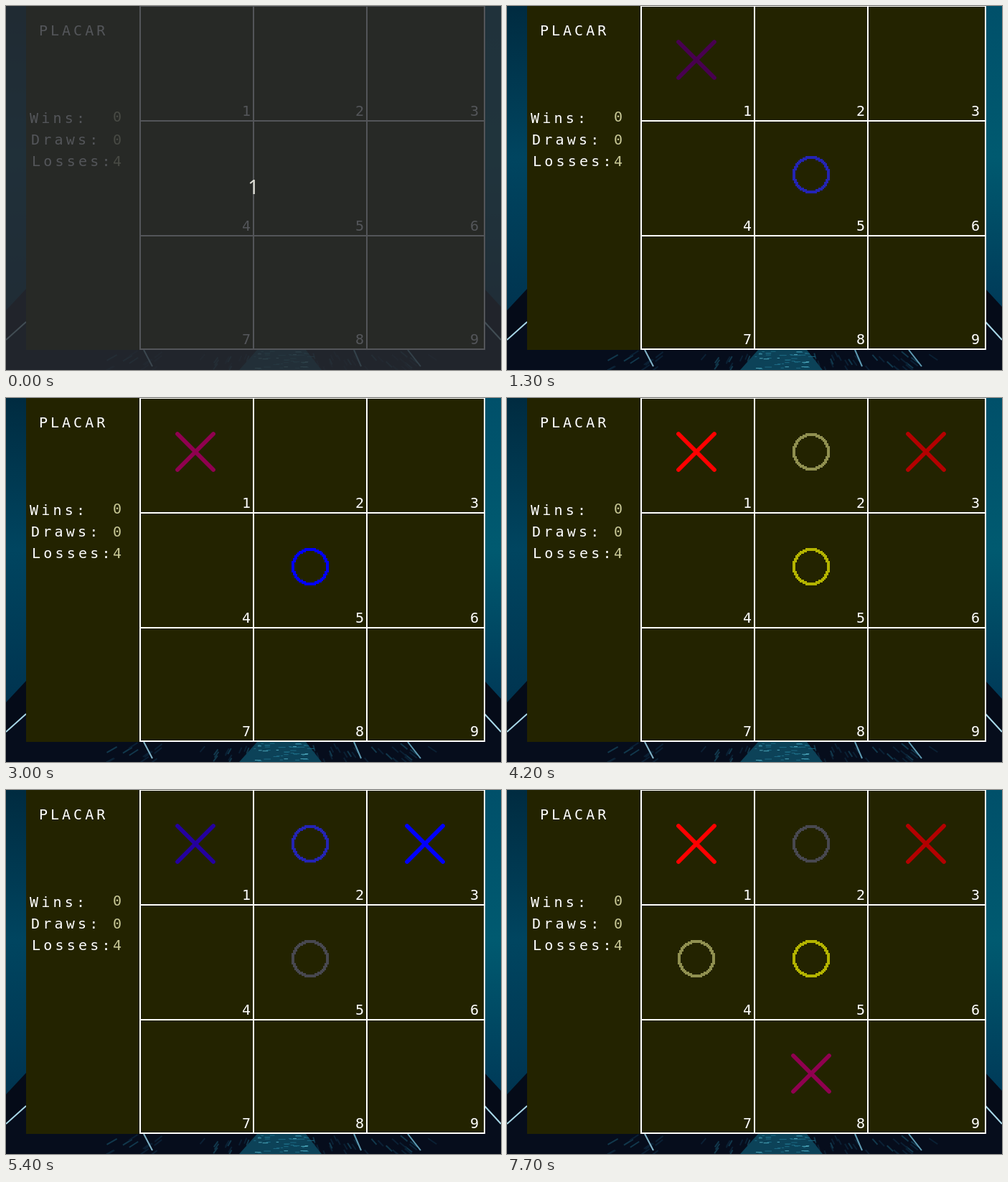
An HTML page with a canvas that plays this animation: 690 by 507 pixels, repeating every 8000 ms.

```html
<!DOCTYPE html>
<html lang="pt">
<meta charset="utf-8">
<title>Placar</title>
<style>
  html, body { margin: 0; width: 100%; height: 100%; overflow: hidden; background: #060d1c; }
  canvas { display: block; }
</style>
<canvas id="stage" width="690" height="507"></canvas>
<script>
const ctx = document.getElementById('stage').getContext('2d');
const LOOP = 8000;
const MONO = '20px "DejaVu Sans Mono", monospace';
const CROSS_COLORS = ['#f00', '#b40000', '#900050', '#480050', '#2400a0', '#00f'];
const RING_COLORS = ['#b4b400', '#909050', '#484850', '#2424b4', '#00f', '#ff0'];

// Pieces in colour order, with the time each is placed.
const crosses = [{ cell: 1, from: 100 }, { cell: 3, from: 4000 }, { cell: 8, from: 6700 }];
const rings = [{ cell: 5, from: 100 }, { cell: 4, from: 6700 }, { cell: 2, from: 4000 }];

function rect(x, y, w, h, color) {
  ctx.fillStyle = color;
  ctx.fillRect(x, y, w, h);
}

function shape(points, color) {
  ctx.beginPath();
  points.forEach(([x, y]) => ctx.lineTo(x, y));
  ctx.fillStyle = color;
  ctx.fill();
}

function line(x1, y1, x2, y2, color, width) {
  ctx.beginPath();
  ctx.moveTo(x1, y1);
  ctx.lineTo(x2, y2);
  ctx.strokeStyle = color;
  ctx.lineWidth = width;
  ctx.stroke();
}

function text(str, x, y, color = '#fff', spacing = 0) {
  ctx.font = MONO;
  ctx.letterSpacing = spacing + 'px';
  ctx.fillStyle = color;
  ctx.fillText(str, x, y);
}

function wall(x, w, top, middle, bottom) {
  const shade = ctx.createLinearGradient(0, 0, 0, 420);
  shade.addColorStop(0, top);
  shade.addColorStop(0.5, middle);
  shade.addColorStop(1, bottom);
  rect(x, 0, w, 430, shade);
}

function drawCity() {
  rect(0, 0, 690, 507, '#060d1c');
  wall(0, 28, '#002b40', '#004560', '#003450');
  wall(667, 23, '#00506a', '#005a70', '#003a58');
  shape([[28, 394], [28, 440], [0, 465], [0, 424]], '#050b18');
  shape([[667, 394], [667, 440], [690, 465], [690, 419]], '#050b18');

  let seed = 7;
  const random = () => (seed = seed * 16807 % 2147483647) / 2147483647;
  for (let i = 0; i < 60; i++) {
    const x = 150 + random() * 440;
    const y = 480 + random() * 24;
    line(x, y, x + (x - 390) * 0.06, y + 8, i % 3 ? '#0b2034' : '#12384c', 2);
  }
  shape([[350, 479], [418, 479], [440, 507], [325, 507]], '#0c4258');
  for (let i = 0; i < 45; i++) {
    const y = 480 + random() * 25;
    rect(345 + random() * 76, y, 3 + random() * 7, 1, i % 4 ? '#1c6a84' : '#4ba3b8');
  }
  line(0, 465, 28, 440, '#a8d8e8', 2);
  line(667, 440, 690, 465, '#a8d8e8', 2);
  line(192, 479, 204, 502, '#82b4c8', 2);
  line(485, 479, 495, 502, '#5f9cb4', 2);
  line(560, 479, 578, 502, '#5f9cb4', 2);
}

function drawBoard() {
  rect(28, 0, 639, 479, '#232300');
  [186, 344, 502, 666].forEach(x => rect(x, 0, 2, 479, '#fff'));
  rect(186, 0, 482, 1, '#fff');
  [159, 319, 477].forEach(y => rect(186, y, 482, 2, '#fff'));
  for (let i = 0; i < 9; i++)
    text(i + 1, [329, 487, 647][i % 3], [153, 313, 471][Math.floor(i / 3)]);

  text('PLACAR', 46, 41, '#fff', 4);
  [['Wins:', 0, 33, 163, 161], ['Draws:', 0, 35, 193, 193], ['Losses:', 4, 36, 223, 223]]
    .forEach(([label, score, x, y, scoreY]) => {
      text(label, x, y, '#fff', 4.2);
      text(score, 149, scoreY, '#c8c896');
    });
}

const center = cell => [264 + (cell - 1) % 3 * 160, 75 + Math.floor((cell - 1) / 3) * 160];

function drawCross(cell, color) {
  const [x, y] = center(cell);
  ctx.lineCap = 'round';
  line(x - 25, y - 25, x + 25, y + 25, color, 5.8);
  line(x + 25, y - 25, x - 25, y + 25, color, 5.8);
  ctx.lineCap = 'butt';
}

function drawRing(cell, color) {
  const [x, y] = center(cell);
  for (let i = -13; i < 13; i++)
    for (let j = -13; j < 13; j++) {
      const radius = Math.hypot(i + 0.5, j + 0.5);
      if (radius > 10.9 && radius < 13) rect(x + i * 2, y + j * 2, 2, 2, color);
    }
}

// Colour phase: slow at both ends of the loop, one step per 75 ms between.
function phaseAt(t) {
  if (t < 400) return 2;
  if (t >= 6800) return 3 + Math.floor((t - 6800) / 300);
  return Math.floor(Math.floor(t / 100) * 4 / 3 + 0.1) + 4;
}

function drawPieces(t) {
  const phase = phaseAt(t);
  const placed = list => list.filter(piece => t >= piece.from);
  placed(crosses).forEach((p, i) => drawCross(p.cell, CROSS_COLORS[(phase + i) % 6]));
  placed(rings).forEach((p, i) => drawRing(p.cell, RING_COLORS[(600 - phase + i) % 6]));
}

function drawPrompt() {
  rect(0, 0, 690, 507, 'rgba(40, 43, 48, 0.8)');
  ctx.font = '27px "Noto Sans", sans-serif';
  ctx.letterSpacing = '0px';
  ctx.textAlign = 'center';
  ctx.fillStyle = '#deded6';
  ctx.fillText('1', 345, 262);
  ctx.textAlign = 'left';
}

function frame() {
  const t = performance.now() % LOOP;
  drawCity();
  drawBoard();
  if (t < 100) drawPrompt();
  else drawPieces(t);
  requestAnimationFrame(frame);
}
frame();
</script>
</html>
```
